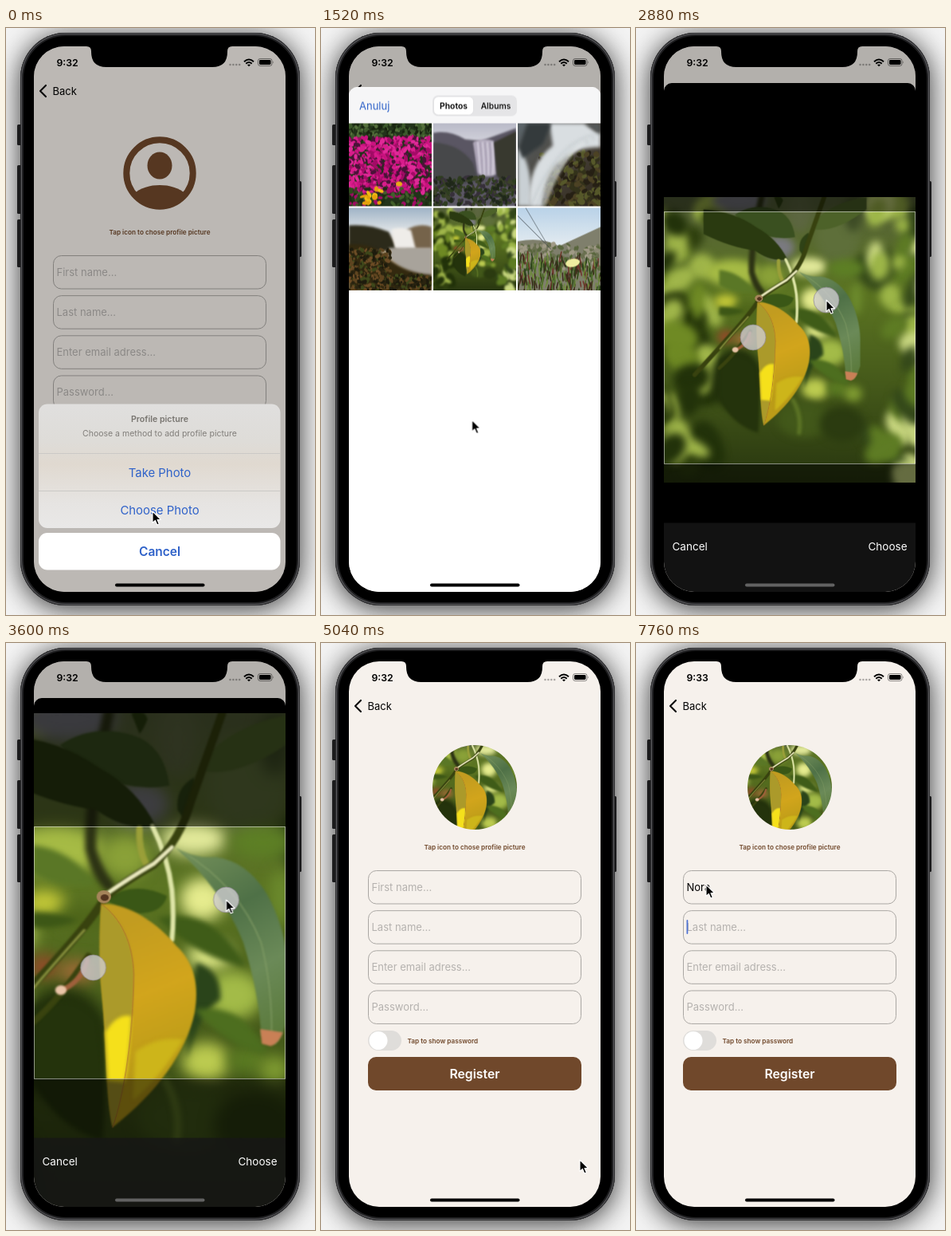
Write an HTML page with a canvas that moves like this. It is 388 by 736 pixels and loops after 8 s.

```html
<!DOCTYPE html>
<html lang="en">
<head>
<meta charset="utf-8">
<title>Profile picture sign-up</title>
<style>
html, body { margin: 0; width: 388px; height: 736px; overflow: hidden; background: #f4f4f4; }
body { position: relative; font-family: Inter, sans-serif; }
.full, canvas { position: absolute; }
.full { left: 0; top: 0; width: 388px; height: 736px; }
svg { display: block; overflow: visible; }
#body { position: absolute; left: 18px; top: 6px; width: 351px; height: 718px; border-radius: 57px;
  background: #000; box-shadow: inset 0 0 0 1px #2a2a2c, inset 0 0 0 2px #5c5c5f, inset 0 0 0 4px #202022, 0 4px 34px rgba(0,0,0,.8); }
#screen { clip-path: inset(23px 37px 29px 35px round 38px); background: #f6f1ec; }
#dim { background: #000; }
#picker { position: absolute; left: 35px; top: 69px; width: 316px; height: 638px; overflow: hidden;
  border-radius: 10px 10px 0 0; background: #fff; }
#picker > .full { left: -35px; top: -69px; }
#crop { background: #000; clip-path: inset(0 37px 0 35px); }
#avatar { left: 140px; top: 128px; border-radius: 50%; }
#zoom { left: -126px; top: 93px; transform-origin: 319px 271.5px; }
text { font-family: Inter, sans-serif; font-size: 13px; }
.mid { text-anchor: middle; }
.semi { font-weight: 600; }
.ph { fill: #b5b2af; }
.small { font-size: 8.2px; font-weight: 600; fill: #70482b; }
.blue { fill: #2f62c9; font-size: 14.9px; }
.field rect { fill: none; stroke: #aaa7a3; }
</style>
</head>
<body>
<svg class="full" viewBox="0 0 388 736" fill="#2c2c2e">
  <rect x="14" y="121" width="6" height="26" rx="1.5"/><rect x="14" y="172" width="6" height="61" rx="1.5"/>
  <rect x="14" y="240" width="6" height="60" rx="1.5"/><rect x="366" y="192" width="5" height="95" rx="1.5"/>
</svg>
<div id="body"></div>

<div id="screen" class="full">
  <svg class="full" viewBox="0 0 388 736">
    <path d="M50 72l-7 7 7 7" fill="none" stroke="#111" stroke-width="2.2" stroke-linecap="round" stroke-linejoin="round"/>
    <text x="58.500" y="84">Back</text>
    <g id="icon" fill="#70482b">
      <circle cx="193" cy="182" r="41.700" fill="none" stroke="#70482b" stroke-width="8"/>
      <ellipse cx="193" cy="172.500" rx="15.500" ry="17"/>
      <path d="M159 209C169 200 181 197 193 197S217 200 227 209A43 43 0 0 1 159 209Z"/>
    </g>
    <text class="small mid" x="193" y="258.500">Tap icon to chose profile picture</text>
    <g class="field" id="fields"></g>
    <text id="name" x="63.500" y="311"></text>
    <rect id="caret" x="63.500" y="297" width="1.800" height="18" rx=".9" fill="#4f72d2"/>
    <rect x="59" y="486" width="42" height="25" rx="12.500" fill="#dfddda"/>
    <circle cx="72" cy="498.500" r="11.500" fill="#fff"/>
    <text class="small" x="108.500" y="501.500">Tap to show password</text>
    <rect x="59" y="519" width="268" height="42" rx="10" fill="#70482b"/>
    <text class="mid semi" x="193" y="546" style="font-size:15.800px" fill="#fff">Register</text>
  </svg>
  <canvas id="avatar" width="106" height="106"></canvas>
  <div id="dim" class="full"></div>

  <svg id="sheet" class="full" viewBox="0 0 388 736">
    <linearGradient id="frost" x2="0" y2="1">
      <stop stop-color="#e0dfde"/><stop offset=".3" stop-color="#dedcd8"/>
      <stop offset=".48" stop-color="#e0d9d0"/><stop offset=".8" stop-color="#e6e4e2"/><stop offset="1" stop-color="#e9e8e7"/>
    </linearGradient>
    <rect x="41" y="471.500" width="303.500" height="155.500" rx="11" fill="url(#frost)"/>
    <path d="M41 533.500H344.500M41 580.500H344.500" stroke="#cbc9c6"/>
    <g class="mid">
      <text class="semi" x="193" y="493.500" style="font-size:10.600px" fill="#77746f">Profile picture</text>
      <text x="193" y="511.500" style="font-size:10.500px" fill="#817e7a">Choose a method to add profile picture</text>
      <text class="blue" x="193" y="563">Take Photo</text>
      <text class="blue" x="193" y="610">Choose Photo</text>
      <rect x="41" y="633" width="303.500" height="46.500" rx="11" fill="#fff"/>
      <text class="blue semi" x="193" y="662" style="font-size:15.500px">Cancel</text>
    </g>
  </svg>

  <div id="picker">
    <div id="list" class="full">
      <svg class="full" viewBox="0 0 388 736">
        <rect x="35" y="69" width="316" height="45" fill="#f6f6f7"/>
        <text class="blue" x="48" y="97" style="font-size:13px">Anuluj</text>
        <rect x="140" y="79" width="106" height="26" rx="7" fill="#e5e5e7"/>
        <rect x="141.500" y="80.500" width="50" height="23" rx="6" fill="#fff" stroke="#d8d8da" stroke-width=".6"/>
        <g class="mid"><text class="semi" x="166.500" y="96" style="font-size:10.400px">Photos</text>
        <text x="219.500" y="96" style="font-size:10.400px;font-weight:500">Albums</text></g>
      </svg>
      <div id="grid" class="full"></div>
    </div>
    <div id="crop" class="full">
      <canvas id="zoom" width="638" height="638"></canvas>
      <svg class="full" viewBox="0 0 388 736">
        <path d="M35 69H351V230H35ZM35 546H351V707H35Z" opacity=".5"/>
        <rect x="35.500" y="230.500" width="315" height="316" fill="none" stroke="#fff" stroke-opacity=".5"/>
        <rect x="35" y="620.500" width="316" height="87" fill="#171716" opacity=".82"/>
        <g fill="#fff"><text x="45.500" y="655" style="font-size:13.500px">Cancel</text>
        <text x="340.500" y="655" text-anchor="end" style="font-size:13.500px">Choose</text></g>
      </svg>
    </div>
  </div>
</div>

<svg class="full" viewBox="0 0 388 736">
  <path d="M101 22V23Q107 23 107 29V30Q107 49 126 49H259Q278 49 278 30V29Q278 23 284 23V22Z"/>
  <g class="semi"><text id="t32" x="63.500" y="47.500" style="font-size:12.300px">9:32</text>
  <text id="t33" x="63.500" y="47.500" style="font-size:12.300px">9:33</text></g>
  <path d="M281.500 46H294" stroke="#000" stroke-opacity=".3" stroke-width="2.600" stroke-linecap="round" stroke-dasharray="0 3.900"/>
  <g fill="none" stroke="#000" stroke-width="2"><path d="M299 42.300Q305 36.700 311 42.300M301.300 44.700Q305 41.300 308.700 44.700"/></g>
  <path d="M303 46.200Q305 44.700 307 46.200L305 48.300Z"/>
  <rect x="316.500" y="38.500" width="17.500" height="9" rx="2.600" fill="none" stroke="#000" stroke-opacity=".45"/>
  <rect x="318" y="40" width="14.500" height="6" rx="1.400"/>
  <path d="M335.300 41.500Q336.800 43 335.300 44.500Z" opacity=".5"/>
  <rect id="home" x="137" y="696.500" width="112.500" height="4" rx="2"/>
  <g id="touches" fill="#cfcdd2" fill-opacity=".78" stroke="#8d8790" stroke-opacity=".7">
    <circle id="near" r="16"/><circle id="far" r="16"/>
  </g>
  <path id="cursor" d="M0 0V14.500L3.400 11.400L5.800 17L8.300 16L6 10.500H10.500Z" stroke="#fff" stroke-width="1.100" stroke-linejoin="round"/>
</svg>

<script>
const LOOP = 8000, HOLD = 'steps(1)', OUT = 'cubic-bezier(.2,.7,.2,1)', SOFT = 'cubic-bezier(.4,0,.2,1)';
const $ = id => document.getElementById(id);
const NAME = 'Nora';

// ---- form ----
['First name...', 'Last name...', 'Enter email adress...', 'Password...'].forEach((label, i) => {
  const y = 285.5 + i * 50.15;
  $('fields').innerHTML += `<rect x="59.5" y="${y}" width="267" height="41.5" rx="10"/>
    <text class="ph" id="ph${i}" x="63.5" y="${y + 25.5}">${label}</text>`;
});
$('name').innerHTML = [...NAME].map((c, i) => `<tspan id="ch${i}">${c}</tspan>`).join('');

// ---- photos ----
let seed = 7;
const rnd = () => (seed = (seed * 16807) % 2147483647) / 2147483647;
const pick = a => a[Math.floor(rnd() * a.length)];

function blob(c, x, y, rx, ry, color, turn = 0) {
  c.fillStyle = color;
  c.beginPath();
  c.ellipse(x, y, rx, ry, turn, 0, 7);
  c.fill();
}
function shape(c, d, color) { c.fillStyle = color; c.fill(new Path2D(d)); }
function line(c, d, color, w) {
  c.strokeStyle = color;
  c.lineWidth = w;
  c.lineCap = 'round';
  c.stroke(new Path2D(d));
}
function fade(c, x0, y0, x1, y1, ...colors) {
  const g = c.createLinearGradient(x0, y0, x1, y1);
  colors.forEach((k, i) => g.addColorStop(i / (colors.length - 1), k));
  return g;
}
function specks(c, n, x, y, w, h, r, colors) {
  while (n--) blob(c, x + rnd() * w, y + rnd() * h, r * (.5 + rnd()), r * (.4 + rnd() * .6), pick(colors), rnd() * 3);
}

function leafScene(c) {
  c.translate(126, -93);
  c.fillStyle = fade(c, 0, 93, 0, 731, '#55603a', '#5c7522', '#44581a', '#28360f');
  c.fillRect(-126, 93, 638, 638);
  c.filter = 'blur(9px)';
  specks(c, 50, -126, 93, 150, 638, 34, ['#2f400f', '#6f8a24', '#a0b64a', '#22320a']);
  specks(c, 50, 365, 93, 150, 638, 34, ['#9db648', '#5e7c24', '#cbd982', '#34481a']);
  blob(c, 80, 100, 60, 26, '#74747c');
  blob(c, 170, 205, 34, 26, '#7a7a80');
  blob(c, 215, 125, 26, 45, '#5c6640');
  blob(c, 300, 180, 50, 60, '#5e6f3a');
  blob(c, 335, 130, 20, 40, '#3e4c26');
  blob(c, 65, 262, 60, 30, '#a6bb45');
  blob(c, 50, 326, 26, 16, '#c3c838');
  blob(c, 100, 345, 30, 14, '#4f661a');
  blob(c, 150, 270, 30, 26, '#8aa138');
  blob(c, 235, 248, 40, 20, '#e2e99a');
  blob(c, 246, 322, 28, 26, '#e6ec8e');
  blob(c, 320, 252, 40, 20, '#5d7f25');
  blob(c, 342, 320, 12, 36, '#6d8c2e');
  blob(c, 50, 405, 18, 14, '#96492a');
  blob(c, 90, 412, 22, 16, '#9a6a35');
  blob(c, 255, 392, 28, 18, '#dbe583');
  blob(c, 284, 440, 36, 30, '#a3bb48');
  blob(c, 250, 522, 30, 24, '#bccb50');
  blob(c, 300, 520, 24, 18, '#5a7a22');
  blob(c, 335, 532, 20, 18, '#7e9a31');
  blob(c, 75, 500, 58, 70, '#22300c');
  blob(c, 225, 590, 60, 40, '#42581a');
  blob(c, 310, 600, 50, 40, '#2b3b10');
  c.filter = 'blur(3px)';
  shape(c, 'M36 455Q85 430 118 470Q130 550 122 620Q60 600 35 540Z', '#24330c');
  shape(c, 'M190 345Q260 330 300 405Q245 398 190 345Z', '#3f5c18');
  shape(c, 'M238 400Q270 410 268 446Q242 460 226 520Q232 450 238 400Z', '#2a441a');
  shape(c, 'M236 458Q300 450 325 512Q280 508 236 458Z', '#4d6e1f');
  shape(c, 'M35 255Q85 260 115 305Q70 310 35 290Z', '#5a7726');
  shape(c, 'M35 338Q70 338 92 348Q60 362 35 356Z', '#3d5716');
  line(c, 'M130 93Q106 200 108 260Q116 290 130 305', '#2c3214', 14);
  line(c, 'M200 546Q220 580 214 620', '#5d7526', 9);
  c.filter = 'blur(1px)';
  shape(c, 'M70 132Q110 105 160 120Q198 132 205 182Q130 195 70 132Z', '#3a5020');
  shape(c, 'M0 120Q70 125 118 160Q165 185 188 232Q150 238 115 212Q60 205 0 175Z', '#2a3a10');
  shape(c, 'M255 140Q300 100 365 93L365 120Q300 170 250 165Z', '#4d6229');
  shape(c, 'M215 212Q212 185 235 172Q242 190 222 222Z', '#2f4216');
  shape(c, 'M158 93Q175 88 178 100Q172 115 168 118Z', '#2b3d10');
  shape(c, 'M126 322Q160 298 202 318Q195 345 150 338Z', '#3a5716');
  line(c, 'M184 232Q203 270 208 310Q211 345 208 372', '#dfe6a8', 6);
  line(c, 'M176 278Q167 262 168 235', '#9a9f39', 8);
  line(c, 'M35 475Q70 445 105 392', '#39430f', 8);
  line(c, 'M72 434Q95 425 104 396', '#a0613c', 6);
  line(c, 'M-20 490Q35 430 75 385T125 320Q150 300 185 280Q218 250 232 200Q250 150 270 93', '#38420f', 10);
  line(c, 'M128 315Q155 296 186 278L208 258', '#ecebc0', 5);
  line(c, 'M37 432Q55 410 100 360', '#8b9440', 3);
  blob(c, 71, 434, 7, 6, '#eac5a8');
  shape(c, 'M213 259Q235 272 262 270Q300 275 325 315Q350 360 351 410V470Q345 490 336 501L318 490Q316 440 296 375Q270 310 213 259Z',
    fade(c, 230, 270, 350, 480, '#6f8c58', '#4f7147', '#6b8a58', '#5b7a3c'));
  line(c, 'M222 264Q290 305 318 375Q332 430 331 490', '#86a068', 1.2);
  shape(c, 'M317 482L345 486Q340 500 330 503L319 500Z', '#c98056');
  shape(c, 'M121 328C150 325 190 350 214 380C236 400 242 430 236 462C226 510 190 560 135 603C126 560 128 500 122 440C118 400 119 360 121 328Z',
    fade(c, 150, 350, 215, 520, '#c29c20', '#d2a51c', '#bb9c18'));
  shape(c, 'M121 328C145 345 160 375 161 415C160 490 150 560 135 603C126 560 128 500 122 440C118 400 119 360 121 328Z', '#ab9a2a');
  c.filter = 'blur(2px)';
  shape(c, 'M126 486Q140 462 158 466Q156 510 150 548L129 546Z', '#f5e01b');
  shape(c, 'M163 510Q190 490 222 495Q195 540 160 570Z', '#cdb51a');
  c.filter = 'none';
  line(c, 'M121 328C145 345 160 375 161 415C160 490 150 560 135 603', '#b0742c', 1);
  blob(c, 124, 319, 9, 8, '#a5845a');
  blob(c, 125, 320, 5, 4, '#54351f');
}

// Each painter fills a 104 px square.
const painters = [
  c => {
    c.fillStyle = '#22331a'; c.fillRect(0, 0, 104, 104);
    specks(c, 200, 0, 0, 104, 22, 2.5, ['#3d5a2c', '#18240f', '#55703c']);
    specks(c, 700, 0, 18, 104, 68, 3, ['#c9127f', '#e02a98', '#a30b66', '#d81c8b', '#4a1238']);
    specks(c, 110, 0, 82, 104, 22, 3, ['#2e4a1c', '#41602a', '#1c2c12', '#a30b66']);
    specks(c, 14, 18, 82, 24, 18, 4, ['#f2bd13', '#e5a10d']);
    blob(c, 63, 76, 4, 3, '#e8a818');
  },
  c => {
    c.fillStyle = fade(c, 0, 0, 0, 24, '#b9bac8', '#d3d3dc'); c.fillRect(0, 0, 104, 104);
    c.filter = 'blur(1px)';
    shape(c, 'M0 12Q20 8 40 20L60 22L104 6V104H0Z', '#5a5663');
    shape(c, 'M0 24Q34 26 50 50L56 72L0 84Z', '#47484a');
    shape(c, 'M50 24Q62 17 76 22L79 64Q66 70 56 62Z', '#b7afc0');
    shape(c, 'M76 24L104 10V90L80 66Z', '#38392f');
    for (let i = 0; i < 8; i++) line(c, `M${53 + i * 3} 24Q${55 + i * 3} 45 ${57 + i * 2.5} 64`, i % 2 ? '#e0dbe8' : '#a49cb0', 1.5);
    c.filter = 'none';
    specks(c, 260, 0, 68, 104, 36, 3, ['#2f3d20', '#20281a', '#3a4228', '#37303a']);
  },
  c => {
    c.fillStyle = fade(c, 0, 0, 104, 104, '#5c666c', '#49433a', '#2b2419'); c.fillRect(0, 0, 104, 104);
    specks(c, 240, 30, 36, 74, 68, 4, ['#33321a', '#4c4224', '#262014', '#56582a']);
    c.filter = 'blur(2px)';
    shape(c, 'M0 30Q20 52 16 104H0Z', '#c9d0d4');
    shape(c, 'M40 0H84L104 14V30Q70 30 56 46Q34 60 30 104H14Q12 52 44 28Z', '#d9dee1');
    shape(c, 'M84 0H104V14Z', '#55595a');
    shape(c, 'M12 0L42 0L32 26L6 44L2 30Z', '#343a3c');
    for (let i = 0; i < 6; i++) line(c, `M${104 - i * 4} ${14 + i * 2}Q${50 + i} ${20 + i * 4} ${18 + i * 3} ${104}`, i % 2 ? '#f4f6f7' : '#b4bdc1', 2);
    c.filter = 'none';
  },
  c => {
    c.fillStyle = fade(c, 0, 0, 0, 60, '#9fb3c6', '#e2e6e8', '#d2b58f'); c.fillRect(0, 0, 104, 104);
    c.filter = 'blur(1.5px)';
    shape(c, 'M0 22Q26 20 50 30L62 54H0Z', '#2c2a1a');
    shape(c, 'M72 28Q88 18 104 24V52H72Z', '#75634a');
    shape(c, 'M54 27Q66 23 78 28L84 52H58Z', '#efede9');
    shape(c, 'M50 50H104V86Q70 84 50 62Z', '#a8a39b');
    shape(c, 'M0 46Q34 44 50 64Q72 82 104 84V104H0Z', '#33290f');
    c.filter = 'none';
    specks(c, 330, 0, 52, 52, 52, 2.6, ['#5f4520', '#2a2410', '#3e481b', '#6d4d26', '#1d1b0d']);
    specks(c, 160, 46, 84, 58, 20, 2.6, ['#5f4520', '#2a2410', '#3e481b', '#1d1b0d']);
  },
  c => c.drawImage($('zoom'), 0, 0, 104, 104),
  c => {
    c.fillStyle = fade(c, 0, 0, 0, 50, '#b9d2e8', '#e6edf1'); c.fillRect(0, 0, 104, 104);
    shape(c, 'M0 42Q30 36 52 48L104 24V104H0Z', '#7f7f6c');
    specks(c, 200, 0, 46, 104, 30, 3, ['#8c8a74', '#6a7050', '#a09a86', '#59663d']);
    for (let i = 0; i < 260; i++) {
      const x = rnd() * 104, y = 66 + rnd() * 42;
      line(c, `M${x} ${y}l${rnd() * 6 - 3} ${-6 - rnd() * 7}`, pick(['#4d6a2c', '#6f8a3c', '#2f451c', '#6e342a', '#3a2a1a']), 1.5);
    }
    line(c, 'M0 10L42 52', '#3c4348', .8);
    line(c, 'M10 0L36 44', '#3c4348', .6);
    blob(c, 69, 69, 9, 5, '#f0eda0', -.2);
  }
];

leafScene($('zoom').getContext('2d'));
painters.forEach((paint, i) => {
  const cv = document.createElement('canvas');
  cv.width = cv.height = 104;
  cv.style.cssText = `left:${35 + i % 3 * 106}px;top:${i < 3 ? 114 : 220}px`;
  paint(cv.getContext('2d'));
  $('grid').append(cv);
});
$('avatar').getContext('2d').drawImage($('zoom'), 161, 137, 316, 316, 0, 0, 106, 106);

// ---- timeline: rows are [ms, value, easing to the next row] ----
function play(id, prop, rows) {
  const frames = rows.map(([t, v, easing = 'linear']) => ({ offset: t / LOOP, [prop]: v, easing }));
  frames.push({ offset: 1, [prop]: rows.at(-1)[1] });
  $(id).animate(frames, { duration: LOOP, iterations: Infinity });
}
const show = (id, from, to = LOOP, prop = 'opacity') => play(id, prop,
  [...(from > 0 ? [[0, 0, HOLD]] : []), [from, 1, HOLD], ...(to < LOOP ? [[to, 0, HOLD]] : [])]);
const at = (x, y) => `translate(${x}px,${y}px)`;
const move = (id, rows) => play(id, 'transform', rows.map(([t, x, y, e]) => [t, at(x, y), e]));

play('dim', 'opacity', [[0, .235], [100, .235, SOFT], [640, 0], [1000, 0, OUT], [1560, .27], [4650, .27, SOFT], [5040, 0]]);
move('sheet', [[0, 0, 0], [60, 0, 0, SOFT], [720, 0, 240]]);
move('picker', [[0, 0, 645], [1000, 0, 645, OUT], [1660, 0, 0], [4650, 0, 0, SOFT], [5040, 0, 645]]);
show('list', 1440);
move('list', [[0, 0, 0], [2300, 0, 0, OUT], [2720, -95, 0]]);
move('crop', [[0, 316, 0], [2300, 316, 0, OUT], [2720, 0, 0]]);
play('home', 'fill', [[0, '#000'], [2400, '#000'], [2600, '#626262'], [4700, '#626262'], [4900, '#000']]);

const pinch = [[2780, .495], [3280, .82], [3600, 1.0175], [3760, 1.03], [3980, 1.03]];
play('zoom', 'transform', [[0, .495], ...pinch, [4240, 1]].map(([t, s]) => [t, `scale(${s})`, t == 3980 ? 'ease-out' : 'linear']));
const finger = dir => pinch.map(([t, s]) => [t, 193 + dir * 82 * s, 364.5 - dir * 41.8 * s]);
move('near', [[0, 193, 364], ...finger(-1)]);
move('far', [[0, 193, 364], ...finger(1)]);
show('touches', 2780, 3990);
move('cursor', [[0, 184, 606], [1280, 184, 606, SOFT], [2080, 199, 297], [2460, 199, 297, SOFT],
  ...finger(1), [4060, 277.5, 321.5, SOFT], [4540, 325, 648], [5120, 325, 648, SOFT], [5680, 88, 303]]);

show('icon', 0, 4650);
show('avatar', 4650);
show('t32', 0, 5840);
show('t33', 5840);

const keys = [6320, 6480, 6720, 6960];
const nameLen = n => n ? $('name').getSubStringLength(0, n) : 0;
keys.forEach((t, i) => show('ch' + i, t, LOOP, 'fillOpacity'));
show('ph0', 0, keys[0]);
show('caret', 5840);
move('caret', [[0, 0, 0, HOLD], ...keys.map((t, i) => [t, nameLen(i + 1), 0, HOLD]), [7440, 0, 50, HOLD]]);
</script>
</body>
</html>
```
